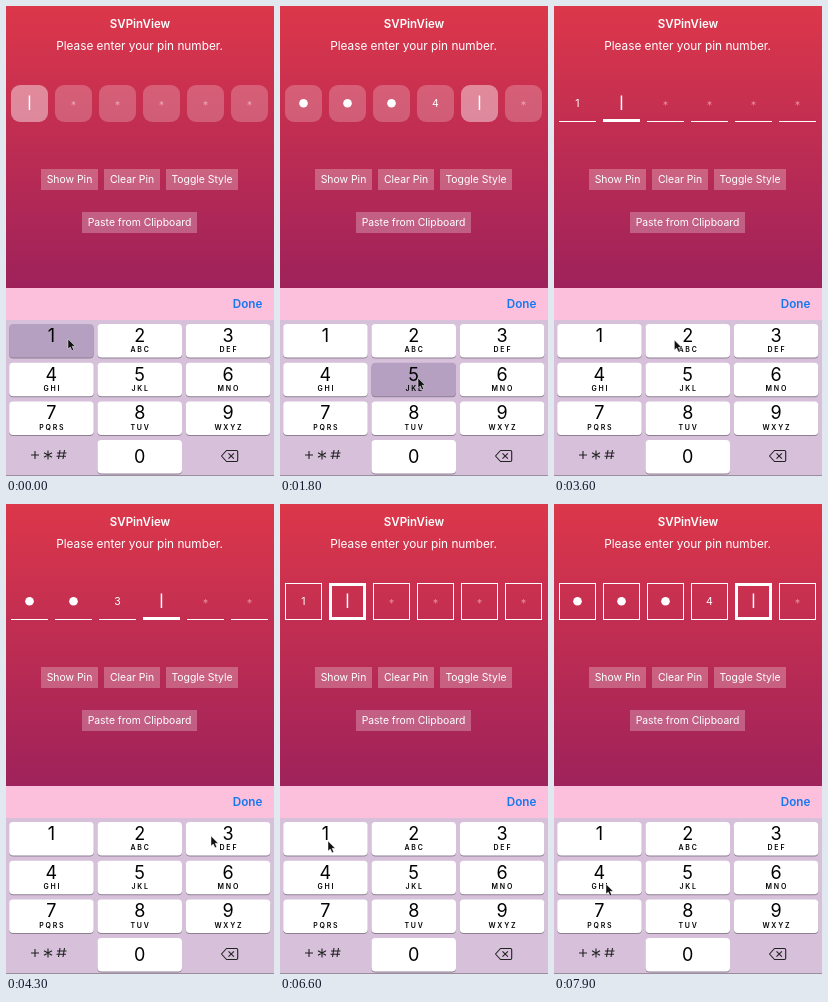
An HTML page that plays this animation: 268x470 px, repeating every 8000 ms.

```html
<!DOCTYPE html>
<html lang="en">
<head>
<meta charset="utf-8">
<title>Pin entry</title>
<style>
html, body { margin: 0; height: 100%; overflow: hidden; }
svg { display: block; width: 268px; height: 470px; font-family: Inter, Roboto, sans-serif; }
text { text-anchor: middle; }
.label { fill: #fff; font-size: 10.4px; }
.num { font-size: 18px; }
.sub { font-size: 7px; font-weight: 600; letter-spacing: 1.8px; }
.icon { fill: none; stroke: #222; stroke-width: 1.1; }
</style>
</head>
<body>
<svg viewBox="0 0 268 470">
  <defs>
    <linearGradient id="sky" x1="0" y1="0" x2="0" y2="1">
      <stop offset="0" stop-color="#dc374a"/>
      <stop offset="1" stop-color="#9e225b"/>
    </linearGradient>
  </defs>
  <rect width="268" height="283" fill="url(#sky)"/>
  <text x="134" y="21.5" fill="#fff" font-size="11.5" font-weight="600">SVPinView</text>
  <text x="133.5" y="44" fill="#fff" font-size="11.8">Please enter your pin number.</text>
  <g id="fields"></g>
  <g id="buttons"></g>
  <rect y="282" width="268" height="33" fill="#fcbfdc"/>
  <text x="241.5" y="302" fill="#1478f0" font-size="11.7" font-weight="600">Done</text>
  <rect y="314" width="268" height="156" fill="#d6c0da"/>
  <g id="keys"></g>
  <path class="icon" d="M25 449h8M29 445v8M42 444.5v9M38 446.7l8 4.6M38 451.3l8-4.6M54 444l-1.5 9M58.500 444l-1.500 9M51 447h9.500M50.500 450.300h9.500"/>
  <path class="icon" stroke-linejoin="round" d="M220.500 444.500h10q1.200 0 1.200 1.200v8.600q0 1.200-1.200 1.200h-10l-5-5.500zM222.500 447.300l5.400 5.400M227.900 447.300l-5.400 5.400"/>
  <rect y="469" width="268" height="1" fill="#9a8d9d"/>
  <path id="pointer" d="M0 0V10L2.300 8L4 11.800L5.700 11L4.100 7.300H7.200Z" fill="#111" stroke="#fff" stroke-opacity=".75" stroke-width=".6"/>
</svg>
<script>
const LOOP = 8000, PRESS = 100, REVEAL = 350;
const $ = id => document.getElementById(id);

// [press time, key]; T toggles the style
const taps = [[0, 1], [470, 2], [900, 3], [1400, 4], [1800, 5], [2420, 'T'],
  [3300, 1], [3700, 2], [4050, 3], [4700, 4], [5100, 5], [5850, 'T'],
  [6350, 1], [6850, 2], [7200, 3], [7600, 4]];

// pointer stops: [arrive, leave, x, y]
const stops = [[0, 120, 62, 333], [450, 600, 138, 334], [880, 1020, 213, 333],
  [1200, 1210, 82, 371], [1380, 1530, 50, 371], [1770, 1920, 138, 372],
  [2380, 2700, 200, 174], [3250, 3430, 50, 334], [3670, 3820, 138, 334],
  [4020, 4320, 205, 332], [4670, 4820, 50, 372], [5070, 5220, 138, 372],
  [5600, 5960, 211, 174], [6320, 6620, 48, 337], [6820, 6960, 136, 335],
  [7160, 7310, 213, 334], [7560, 8000, 52, 380]];

const buttons = [[35, 163, 57, 'Show Pin'], [98, 163, 56, 'Clear Pin'],
  [160, 163, 72, 'Toggle Style'], [76, 206, 115, 'Paste from Clipboard']];
$('buttons').innerHTML = buttons.map(([x, y, w, s]) =>
  `<rect x="${x}" y="${y}" width="${w}" height="21" fill="#fff" fill-opacity=".26"/>
   <text class="label" x="${x + w / 2}" y="${y + 14.3}">${s}</text>`).join('');
const toggleLabel = $('buttons').querySelectorAll('text')[2];

const subs = ['', 'ABC', 'DEF', 'GHI', 'JKL', 'MNO', 'PQRS', 'TUV', 'WXYZ'];
function key(n, col, row, sub) {
  const x = 3.2 + col * 88.3, y = 318 + row * 38.7, mid = x + 42.2;
  return `<rect x="${x}" y="${y + 1}" width="84.5" height="33.500" rx="4" fill="#8d8091"/>
    <rect class="cap" x="${x}" y="${y}" width="84.5" height="33.500" rx="4" fill="#fff"/>
    <text class="num" x="${mid}" y="${y + (n ? 18 : 22.5)}">${n}</text>
    <text class="sub" x="${mid + .9}" y="${y + 28.3}">${sub}</text>`;
}
$('keys').innerHTML = subs.map((s, i) => key(i + 1, i % 3, i / 3 | 0, s)).join('') + key(0, 1, 3, '');
const caps = document.querySelectorAll('.cap');

function pointerAt(t) {
  const i = stops.findLastIndex(s => s[0] <= t);
  const [, leave, x, y] = stops[i], next = stops[i + 1];
  if (t <= leave || !next) return [x, y];
  const u = (t - leave) / (next[0] - leave), e = u * u * (3 - 2 * u);
  return [x + (next[2] - x) * e, y + (next[3] - y) * e];
}

function box(i, style, active) {
  const x = 5 + i * 44;
  if (style === 0)
    return `<rect x="${x}" y="79" width="37" height="37" rx="9" fill="#fff" fill-opacity="${active ? .43 : .22}"/>`;
  if (style === 1)
    return `<rect x="${x}" y="${active ? 113 : 115}" width="37" height="${active ? 3 : 1}" fill="#fff"/>`;
  const w = active ? 3 : 1;
  return `<rect x="${x + w / 2}" y="${79 + w / 2}" width="${37 - w}" height="${37 - w}" fill="none" stroke="#fff" stroke-width="${w}"/>`;
}

function draw(t) {
  let style = 0, pins = [], last = 0, down = null, dim = 0;
  for (const [at, k] of taps) {
    const done = at + PRESS;
    if (t >= at && t < done) down = k;
    if (k === 'T' && t >= at && t < at + 420) dim = Math.min(1, (at + 420 - t) / 150);
    if (t < done) continue;
    last = done;
    if (k === 'T') { style++; pins = []; }
    else pins.push([k, done]);
  }

  let out = '';
  for (let i = 0; i < 6; i++) {
    const x = 23.5 + i * 44, active = i === pins.length;
    out += box(i, style, active);
    if (active) {
      if ((t - last) % 1000 < 500)
        out += `<rect x="${x - .8}" y="89.500" width="1.500" height="14.500" fill="#fff"/>`;
    } else if (i > pins.length) {
      out += `<text x="${x}" y="103" font-size="11" fill="#fff" fill-opacity=".45">*</text>`;
    } else if (t - pins[i][1] < REVEAL) {
      out += `<text x="${x}" y="101" font-size="10.500" fill="#fff">${pins[i][0]}</text>`;
    } else {
      out += `<circle cx="${x}" cy="97.300" r="4.300" fill="#fff"/>`;
    }
  }
  $('fields').innerHTML = out;
  caps.forEach((c, i) => c.setAttribute('fill', down === i + 1 ? '#b6a0c1' : '#fff'));
  toggleLabel.setAttribute('fill-opacity', 1 - .6 * dim);
  $('pointer').setAttribute('transform', `translate(${pointerAt(t)})`);
}

const start = performance.now();
function tick() {
  draw((performance.now() - start) % LOOP);
  requestAnimationFrame(tick);
}
tick();
</script>
</body>
</html>
```
